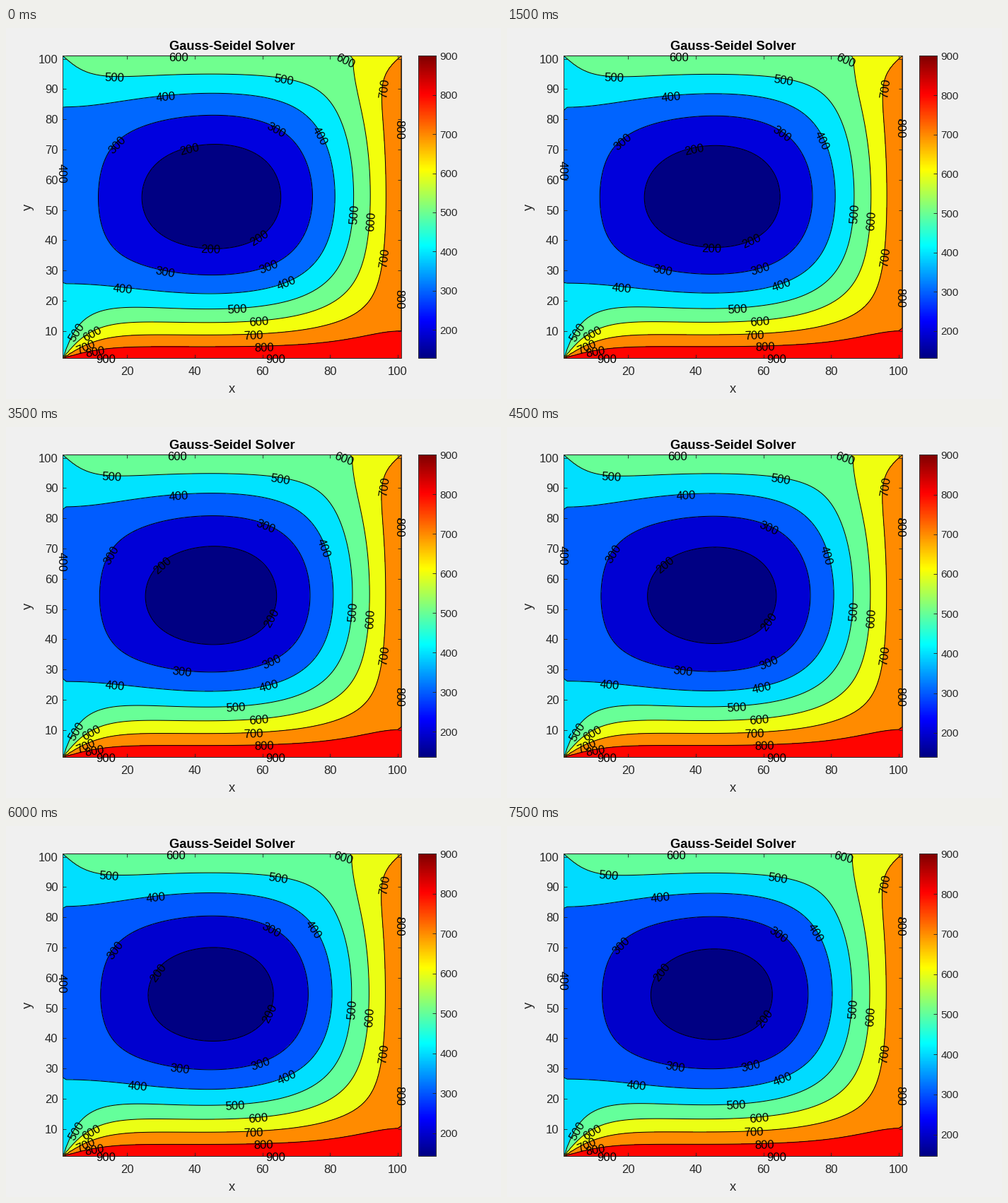
Recreate the animation shown at these times as a matplotlib script. Size 700 by 525 pixels, loop 8 s.

```python
import numpy as np
import matplotlib.pyplot as plt
from matplotlib.animation import FuncAnimation

W, H, DPI = 700, 525, 100
FRAMES, INTERVAL = 16, 500
N = 101
SWEEPS = 3            # solver sweeps per frame
START_MIN = 127.6     # coldest value when the clip begins
LEFT, RIGHT, TOP, BOTTOM = 80.4, 558.9, 39.4, 467.25
BAR_L, BAR_R = 582.5, 607.5
LEVELS = np.arange(200, 901, 100)
EPS = 1e-6
GAP = 240             # label spacing along a contour, px
TEXT_W = 28           # width of a contour label, px
INK = "#262626"

plt.rcParams["font.family"] = "Liberation Sans"


def px(size):
    return size * 72 / DPI


# --- Gauss-Seidel solution of the Laplace equation -------------------------
def initial_grid():
    u = np.zeros((N, N))
    u[:, 0], u[:, -1], u[0], u[-1] = 400, 800, 900, 600
    for i in (0, -1):
        for j in (0, -1):
            u[i, j] = (u[i, 1] + u[1, j]) / 2
    return u


k = np.arange(N - 2)
lag = k[:, None] - k[None, :]
ROW = np.where(lag >= 0, 0.25 ** np.maximum(lag, 0), 0.0)


def sweep(u):
    """One in-place sweep; ROW resolves the recurrence inside each row."""
    for i in range(1, N - 1):
        b = u[i - 1, 1:-1] + u[i + 1, 1:-1] + u[i, 2:]
        b[0] += u[i, 0]
        u[i, 1:-1] = ROW @ (0.25 * b)


def solve():
    u = initial_grid()
    while u.min() < START_MIN:
        sweep(u)
    out = [u.copy()]
    for _ in range(FRAMES - 1):
        for _ in range(SWEEPS):
            sweep(u)
        out.append(u.copy())
    return out


fields = solve()


# --- colours ---------------------------------------------------------------
def jet(t):
    i = np.clip(np.floor(np.asarray(t) * 256), 0, 255) + 1

    def ramp(j):
        return np.clip(np.minimum(j, 192 - j) / 64, 0, 1)

    return np.stack([ramp(i - 96), ramp(i - 32), ramp(i + 32)], axis=-1)


# --- stage -----------------------------------------------------------------
fig = plt.figure(figsize=(W / DPI, H / DPI), dpi=DPI, facecolor="#f0f0f0")
ax = fig.add_axes([0, 0, 1, 1])
ax.axis("off")


def to_x(v):
    return LEFT + (v - 1) * (RIGHT - LEFT) / (N - 1)


def to_y(v):
    return BOTTOM - (v - 1) * (BOTTOM - TOP) / (N - 1)


def line(xs, ys):
    return ax.plot(xs, ys, color=INK, lw=px(0.9), zorder=4,
                   solid_capstyle="butt")[0]


def frame_box(l, r):
    line([l, r, r, l, l], [TOP, TOP, BOTTOM, BOTTOM, TOP])


def write(x, y, s, size=16.67, ha="center", va="center_baseline", **kw):
    kw = {"color": INK, "zorder": 6, **kw}
    return ax.text(x, y, s, fontsize=px(size), ha=ha, va=va,
                   rotation_mode="anchor", **kw)


frame_box(LEFT, RIGHT)
for v in range(20, 101, 20):
    x = to_x(v)
    line([x, x], [BOTTOM, BOTTOM - 4.8])
    line([x, x], [TOP, TOP + 4.8])
    write(x, 491, str(v), va="baseline")
for v in range(10, 101, 10):
    y = to_y(v)
    line([LEFT, LEFT + 4.8], [y, y])
    line([RIGHT, RIGHT - 4.8], [y, y])
    write(73.5, y, str(v), ha="right")
write(319.5, 31, "Gauss-Seidel Solver", 18.33, va="baseline",
      weight="bold", color="black")
write(319.5, 516, "x", 18.33, va="baseline")
write(35.5, 253, "y", 18.33, va="baseline", rotation=90)

bar = jet((np.arange(256) + 0.5) / 256)[:, None, :]
ax.imshow(bar, extent=(BAR_L, BAR_R, BOTTOM, TOP), origin="lower",
          aspect="auto", interpolation="nearest", zorder=1)
ax.set_xlim(0, W)
ax.set_ylim(H, 0)
frame_box(BAR_L, BAR_R)
bar_ticks = [(line([BAR_R, BAR_R - 4.3], [0, 0]),
              write(613.5, 0, str(v), 15, ha="left")) for v in LEVELS]

GX, GY = np.meshgrid(to_x(np.arange(1, N + 1)), to_y(np.arange(1, N + 1)))


# --- contour labels --------------------------------------------------------
def orient(path):
    """Open contours start at the lower left corner. Loops run
    counter-clockwise from the right end of their lowest grid row."""
    x, y = path.T
    if not np.allclose(path[0], path[-1]):
        reach = np.hypot(x - LEFT, y - BOTTOM)
        return path if reach[0] < reach[-1] else path[::-1]
    if np.sum(x[:-1] * y[1:] - x[1:] * y[:-1]) > 0:
        path = path[::-1]
    loop = path[:-1]
    cell = (BOTTOM - TOP) / (N - 1)
    row = BOTTOM - np.ceil((BOTTOM - loop[:, 1].max()) / cell) * cell
    first = np.argmax(np.where(loop[:, 1] >= row - 1e-3, loop[:, 0], 0))
    loop = np.roll(loop, -first, axis=0)
    return np.vstack([loop, loop[:1]])


def place_labels(path):
    """Yield (x, y, angle) for every label on one contour."""
    x, y = orient(path).T
    s = np.append(0, np.cumsum(np.hypot(np.diff(x), np.diff(y))))
    count = int((s[-1] - 2 * TEXT_W) // GAP) + 1
    spare = s[-1] - GAP * (count - 1)
    start = 22 + 0.15 * spare

    for d in start + GAP * np.arange(count):
        ends = d + np.array([-0.5, 0.5]) * TEXT_W
        (x0, x1), (y0, y1) = np.interp(ends, s, x), np.interp(ends, s, y)
        a = round(np.degrees(np.arctan2(y0 - y1, x1 - x0)), 2)
        a = (a + 90) % 180 - 90
        r = np.radians(a)
        yield (x0 + x1) / 2 + 1.2 * np.sin(r), (y0 + y1) / 2 + 1.2 * np.cos(r), a


# --- animation -------------------------------------------------------------
live = []


def draw(n):
    for artist in live:
        artist.remove()
    live.clear()

    z = fields[n]
    low = z.min()
    edges = np.concatenate([[0], LEVELS[:-1] - EPS, [901]])
    shades = jet((np.append(low, LEVELS[:-1]) - low) / (900 - low))
    live.append(ax.contourf(GX, GY, z, levels=edges, colors=shades, zorder=1))
    lines = ax.contour(GX, GY, z, levels=LEVELS - EPS, colors="black",
                       linewidths=px(1), zorder=3)
    live.append(lines)

    for level, segs in zip(LEVELS, lines.allsegs):
        for x, y, a in place_labels(max(segs, key=len)):
            live.append(write(x, y, str(level), rotation=a, color="black"))

    for v, (tick, text) in zip(LEVELS, bar_ticks):
        y = BOTTOM - (v - low) / (900 - low) * (BOTTOM - TOP)
        tick.set_ydata([y, y])
        text.set_y(y)
    return live


anim = FuncAnimation(fig, draw, frames=FRAMES, interval=INTERVAL,
                     init_func=lambda: [], repeat=True, repeat_delay=0,
                     blit=False)
plt.show()
```
